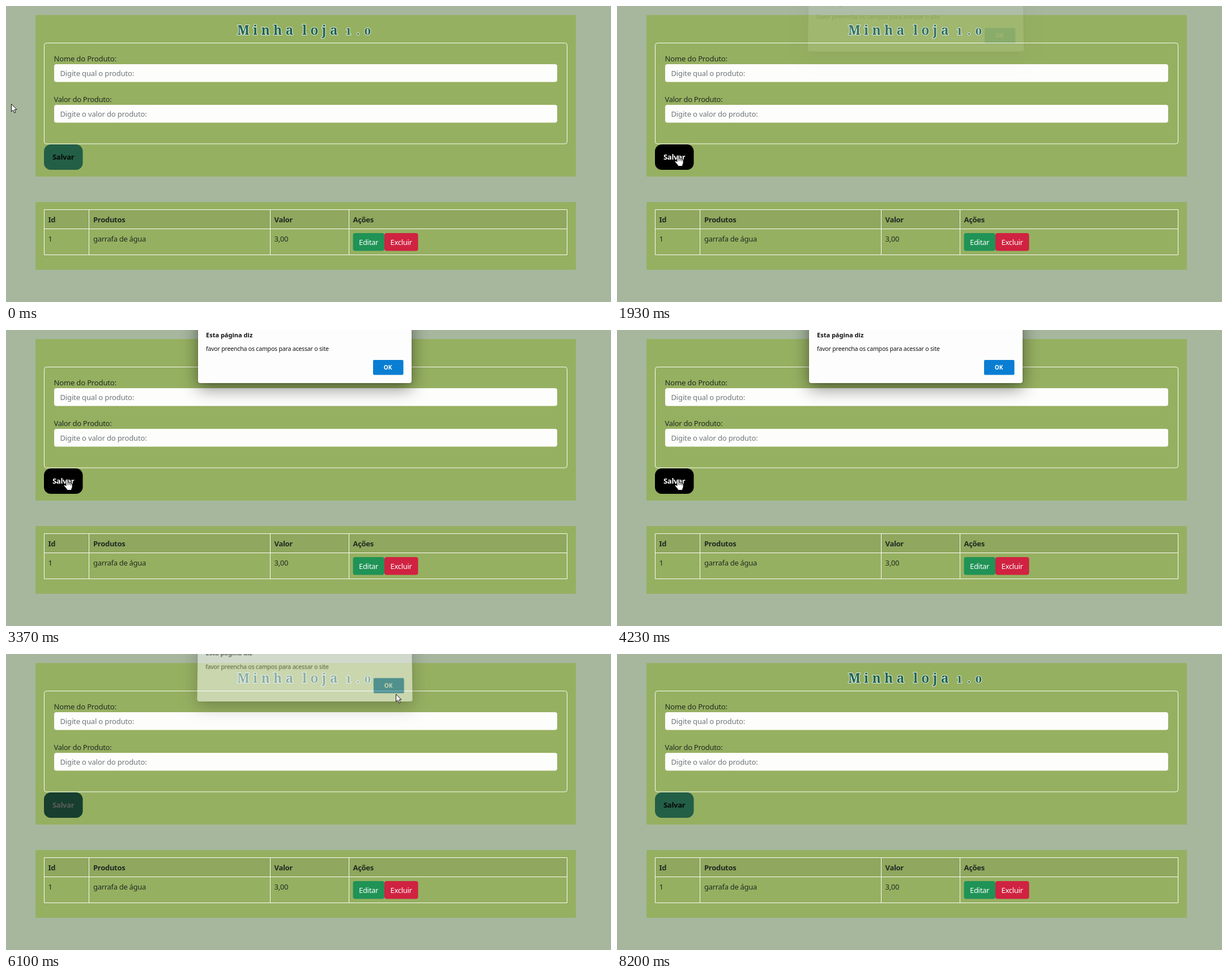
Recreate the animation shown at these times as an HTML page. Size 1068 by 524 pixels, loop 8230 ms.

```html
<!DOCTYPE html>
<html lang="pt-BR">
<head>
<meta charset="utf-8">
<title>Minha loja 1.0</title>
<style>
  html, body { margin: 0; width: 100%; height: 100%; overflow: hidden; background: #a6b79e; }
  svg { position: absolute; left: 0; top: 0; display: block; }
  text { font: 13px "Noto Sans", "Open Sans", sans-serif; letter-spacing: -.15px; fill: #212b22; white-space: pre; }
  .tight { letter-spacing: -.3px; }
  .bold { font-weight: 700; letter-spacing: -.3px; }
  .hint { fill: #70767a; }
  .light { fill: #fff; }
  .panel { fill: #96b061; }
  .line { fill: none; stroke: #fbfdf4; }
  .input { fill: #fdfdfb; }
  .title text {
    font: 700 23px "Noto Serif", "Liberation Serif", serif; letter-spacing: 6.2px;
    fill: #1d6152; stroke: #e2eee2; stroke-width: 2px; paint-order: stroke; stroke-linejoin: round;
  }
  .title .num { font: 700 16px "DejaVu Serif", "Noto Serif", serif; letter-spacing: 8.5px; }
  #dialog {
    position: absolute; left: 339px; top: -30px; width: 376.5px; height: 124px;
    background: #fdfdfd; border-radius: 4px; transform-origin: 50% 0;
    box-shadow: 0 9px 30px rgba(0, 0, 0, .48), 0 1px 3px rgba(0, 0, 0, .2);
  }
  #dialog text { fill: #111; }
  #dialog .head { font-size: 11px; font-weight: 700; letter-spacing: 0; }
  #dialog .msg { font-size: 10.5px; letter-spacing: -.17px; }
  #dialog .ok { font-size: 10px; font-weight: 700; letter-spacing: 0; fill: #fff; text-anchor: middle; }
</style>
</head>
<body>
<svg width="1068" height="524" viewBox="0 0 1068 524">
  <rect class="panel" x="52" y="16" width="954" height="286"/>
  <g class="title">
    <text x="408" y="50.5">Minha</text>
    <text x="523" y="50.5">loja</text>
    <text class="num" x="599" y="50.5">1.0</text>
  </g>
  <rect class="line" x="67.5" y="65.5" width="923" height="178.5" rx="4"/>
  <text x="84.5" y="98">Nome do Produto:</text>
  <rect class="input" x="85" y="103" width="888" height="31.5" rx="4"/>
  <text class="hint" x="95.5" y="124">Digite qual o produto:</text>
  <text class="tight" x="84.5" y="170">Valor do Produto:</text>
  <rect class="input" x="85" y="175" width="888" height="31.5" rx="4"/>
  <text class="hint" x="95.5" y="196">Digite o valor do produto:</text>
  <rect id="save" x="67" y="245" width="68.5" height="45" rx="12"/>
  <text id="saveText" class="bold" x="82" y="272">Salvar</text>

  <rect class="panel" x="52" y="347" width="954" height="120"/>
  <rect x="67" y="360" width="924" height="34" fill="#8fa75e"/>
  <path class="line" d="M67.5 360.5H990.5V440.5H67.5ZM67.5 394.5H990.5M146.5 360.5V440.5M466.5 360.5V440.5M605.5 360.5V440.5"/>
  <text class="bold" x="74.5" y="382.5">Id</text>
  <text class="bold" x="154" y="382.5">Produtos</text>
  <text class="bold" x="473.5" y="382.5">Valor</text>
  <text class="bold" x="612.5" y="382.5">Ações</text>
  <text class="tight" x="74.5" y="417">1</text>
  <text class="tight" x="154" y="417">garrafa de água</text>
  <text class="tight" x="473.5" y="417">3,00</text>
  <rect x="612.5" y="402" width="55.5" height="31.5" rx="4" fill="#209356"/>
  <rect x="668" y="402" width="59.5" height="31.5" rx="4" fill="#d02241"/>
  <text class="tight light" x="623" y="423">Editar</text>
  <text class="tight light" x="678.5" y="423">Excluir</text>
</svg>

<div id="dialog">
  <svg width="376.5" height="124" viewBox="339 -30 376.5 124">
    <text class="head" x="353" y="13">Esta página diz</text>
    <text class="msg" x="353" y="37">favor preencha os campos para acessar o site</text>
    <rect id="ok" x="648" y="53" width="53.5" height="26.5" rx="2"/>
    <text class="ok" x="674" y="69.7">OK</text>
  </svg>
</div>

<svg width="1068" height="524" viewBox="0 0 1068 524">
  <g id="cursor" fill="#fff" stroke="#111" stroke-linejoin="round">
    <path id="arrow" d="M.5 .5V14L3.6 11.2L5.8 16.2L8 15.2L5.9 10.4H10Z"/>
    <path id="hand" stroke-width=".9" d="M-1.5 1.5Q0 -.5 1.5 1.5V7Q3 5.6 4.3 7.2Q6 6.2 7 8Q9.5 7.4 9.5 10V14Q9.5 16 8 18V20H0V18.5L-5 12.5Q-5.5 10 -3.5 10.5L-1.5 12.5Z
      M1.5 7V11M4.3 7.5V11M7 8.5V11.5"/>
  </g>
</svg>

<script>
const LOOP = 8230;
const $ = id => document.getElementById(id);
const clamp = v => Math.min(1, Math.max(0, v));
const ramp = (t, from, to) => clamp((t - from) / (to - from));
const smooth = p => p * p * (3 - 2 * p);
const mix = (a, b, p) => `rgb(${a.map((v, i) => Math.round(v + (b[i] - v) * p))})`;

// time, x, y
const path = [
  [0, 9, 173], [150, 9, 173], [880, 105.5, 264], [1250, 105.5, 264],
  [1500, 107.5, 263.5], [4250, 107.5, 263.5], [5000, 688, 70.5],
  [6650, 688, 70.5], [7050, 700, -24], [LOOP, 700, -24]
];

function cursorAt(t) {
  const i = Math.max(1, path.findIndex(k => k[0] >= t));
  const [t0, x0, y0] = path[i - 1], [t1, x1, y1] = path[i];
  const p = smooth(ramp(t, t0, t1));
  return [x0 + (x1 - x0) * p, y0 + (y1 - y0) * p];
}

function draw(t) {
  const [x, y] = cursorAt(t);
  const overSave = x >= 67 && y >= 245 && t < 4250;
  $('cursor').setAttribute('transform', `translate(${x} ${y})`);
  $('hand').style.display = overSave ? '' : 'none';
  $('arrow').style.display = overSave ? 'none' : '';

  const hover = smooth(ramp(t, 690, 840)) * (1 - smooth(ramp(t, 6010, 6160)));
  $('save').style.fill = mix([35, 95, 70], [0, 0, 0], hover);
  $('saveText').style.fill = mix([5, 10, 8], [255, 255, 255], hover);

  const open = ramp(t, 1910, 2140) * (1 - ramp(t, 6030, 6170));
  const lift = Math.sqrt(1 - open);
  const box = $('dialog').style;
  box.visibility = open > 0 ? 'visible' : 'hidden';
  box.opacity = open;
  box.transform = lift
    ? `translateY(${-15 * lift}px) perspective(1000px) rotateX(${5.6 * lift}deg)`
    : 'none';
  const overOk = x >= 648 && x <= 701 && y >= 53 && y <= 79;
  $('ok').style.fill = overOk ? '#0670b9' : '#0a7ed2';
}

const start = performance.now();
function tick() {
  draw((performance.now() - start) % LOOP);
  requestAnimationFrame(tick);
}
tick();
</script>
</body>
</html>
```
